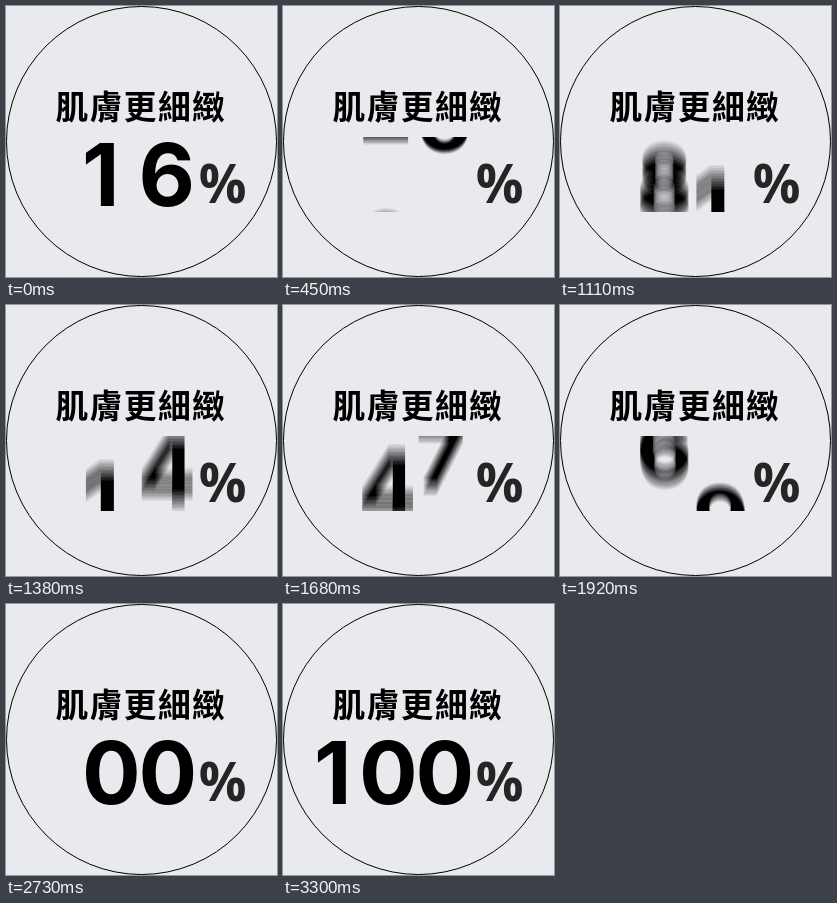
Write an HTML page with a canvas that moves like this. It is 271 px wide and 271 px high and loops after 5.34 s.

```html
<!DOCTYPE html>
<html lang="zh-Hant">
<head>
<meta charset="utf-8">
<title>100%</title>
<style>
  html, body { margin: 0; width: 100%; height: 100%; overflow: hidden; background: #e8eaee; }
  svg, canvas { position: absolute; left: 0; top: 0; width: 271px; height: 271px; display: block; }
  text { font-family: "Noto Sans CJK TC", "Noto Sans CJK", sans-serif; font-weight: 700; }
  .unit { font-family: "Noto Sans", "Open Sans", sans-serif; }
</style>
</head>
<body>
<svg viewBox="0 0 271 271">
  <circle cx="135.5" cy="135.5" r="135" fill="none" stroke="#000"/>
  <text x="49.5" y="113" font-size="32.7" letter-spacing="1.5">肌膚更細緻</text>
  <text class="unit" x="192.7" y="197" font-size="53" fill="#252525">%</text>
</svg>
<canvas></canvas>
<script>
const LOOP = 5340, STEP = 30, LANDED = 91;
const PITCH = 140, BASE = 200, SAMPLES = 17, SHUTTER = 0.5;

// Reel keys: [step, digit position, speed in digits per step]
const reels = [
  { x: 79, keys: [[0, 1, 0], [28, 5.36, .25], [46, 10.8, .315], [56, 13.91, .3], [73, 18.24, .19], [91, 20, 0]] },
  { x: 135.5, keys: [[0, 6, 0], [28, 8.06, .2], [46, 14.03, .33], [56, 17.13, .26], [73, 19.5, .06], [91, 20, 0]] }
];

const canvas = document.querySelector('canvas');
const ctx = canvas.getContext('2d');
const ratio = window.devicePixelRatio || 1;
canvas.width = canvas.height = Math.round(271 * ratio);

function position(keys, s) {
  s = Math.max(0, Math.min(LANDED, s));
  let i = 0;
  while (i < keys.length - 2 && s > keys[i + 1][0]) i++;
  const [s0, p0, v0] = keys[i], [s1, p1, v1] = keys[i + 1];
  const h = s1 - s0, u = (s - s0) / h, w = 1 - u;
  return p0 * (1 + 2 * u) * w * w + v0 * h * u * w * w
    + p1 * u * u * (3 - 2 * u) - v1 * h * u * u * w;
}

// Places a digit by the left edge of its ink
function digit(n, x, dy) {
  const d = String(n % 10);
  ctx.fillText(d, x + ctx.measureText(d).actualBoundingBoxLeft, BASE + dy);
}

function drawReel({ x, keys }, s) {
  ctx.globalAlpha = 1 / SAMPLES;
  for (let i = 0; i < SAMPLES; i++) {
    const p = position(keys, s + (i / (SAMPLES - 1) - 0.5) * SHUTTER);
    const n = Math.floor(p);
    digit(n, x, (n - p) * PITCH);
    digit(n + 1, x, (n + 1 - p) * PITCH);
  }
}

function draw(t) {
  const s = Math.floor(t / STEP);
  ctx.setTransform(ratio, 0, 0, ratio, 0, 0);
  ctx.clearRect(0, 0, 271, 271);
  ctx.font = '700 87px Inter, "Liberation Sans", sans-serif';
  ctx.fillStyle = '#000';
  ctx.save();
  if (s > 0 && s < LANDED) {
    ctx.beginPath();
    ctx.rect(79, 131, 108, 75);
    ctx.clip();
    // Adding alpha averages the samples into a motion blur
    ctx.globalCompositeOperation = 'lighter';
    reels.forEach(r => drawReel(r, s));
  } else {
    reels.forEach(r => digit(position(r.keys, s), r.x, 0));
  }
  ctx.restore();
  const fade = Math.max(0, Math.min(1, (s - 94) / 16));
  if (fade > 0) {
    ctx.globalAlpha = fade;
    digit(1, 34, 0);
    ctx.globalAlpha = 1;
  }
}

const start = performance.now();
function tick() {
  draw((performance.now() - start) % LOOP);
  requestAnimationFrame(tick);
}
draw(0);
requestAnimationFrame(tick);
</script>
</body>
</html>
```
